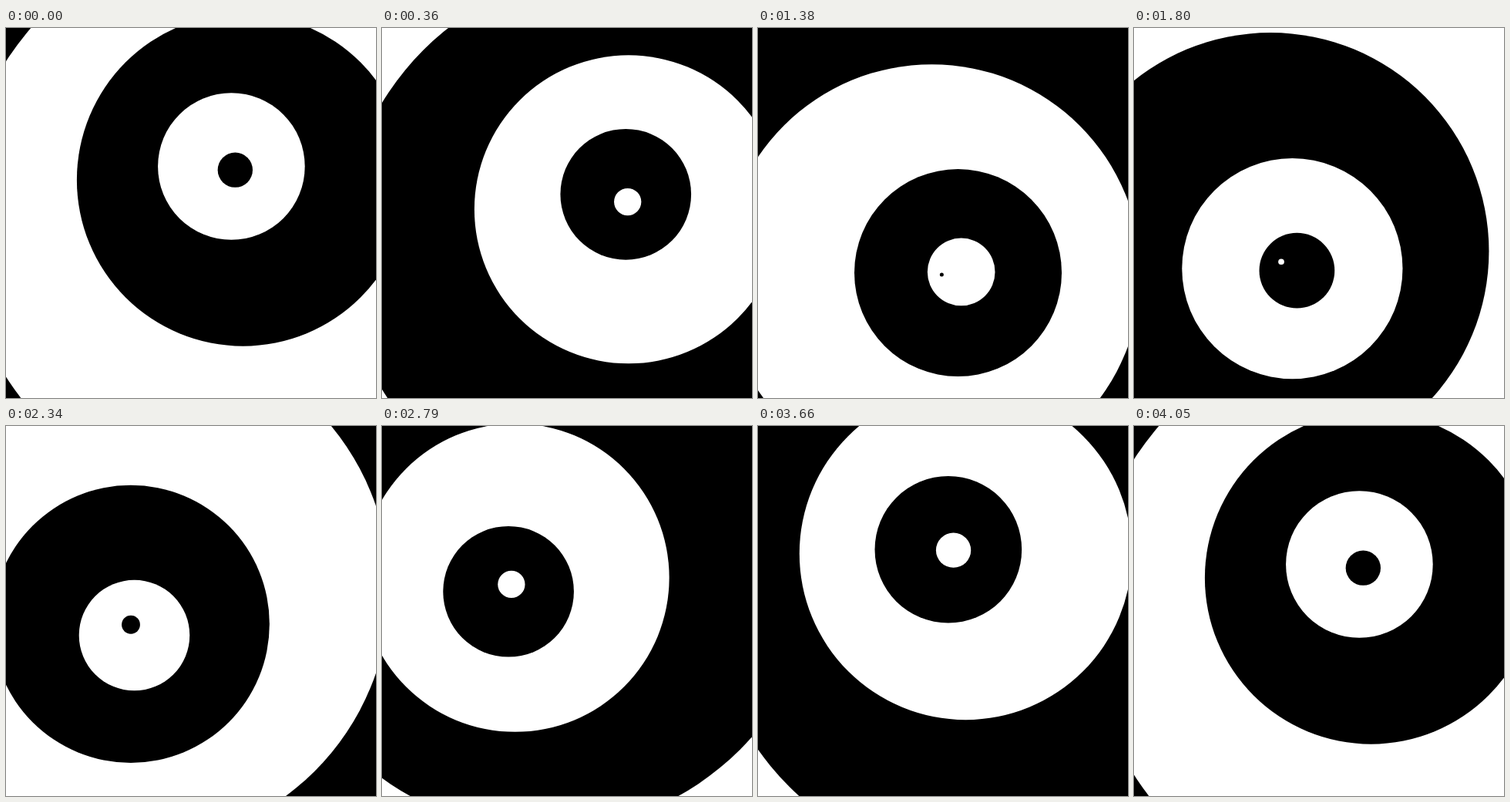
Write an HTML page that moves like this. It is 480 by 480 pixels and loops after 4080 ms.

```html
<!DOCTYPE html>
<html lang="en">
<head>
<meta charset="utf-8">
<title>Swaying rings</title>
<style>
  html, body { margin: 0; width: 100%; height: 100%; overflow: hidden; background: #000; }
  svg { display: block; width: 100%; height: 100%; }
</style>
</head>
<body>
<svg id="stage" viewBox="0 0 480 480"></svg>
<script>
const STEP = 30;            // ms per pose
const STEPS = 135;          // poses in one turn; the first is held twice
const LOOP = 4080;
const RINGS_PER_TURN = 10;
const RING_COUNT = 6;
const PAIR = 27;            // poses per black and white pair
const ORBIT = 80;

const stage = document.getElementById('stage');
const rings = Array.from({ length: RING_COUNT }, () => {
  const ring = document.createElementNS('http://www.w3.org/2000/svg', 'circle');
  stage.prepend(ring);      // younger rings stay on top
  return ring;
});

// Both take the age of a ring, counted in ring intervals.
const radiusAt = age => 3025 * Math.sin(0.0918 * age) ** 2;
const swayAt = age => -49.9 + 10.75 * (age - 1.67) ** 2;

function draw(ms) {
  const pose = Math.floor((ms % LOOP) / STEP) % STEPS;
  // The second half of each pair runs half a pose late.
  const late = pose % PAIR > PAIR / 2 ? 0.5 : 0;
  const turn = (pose - late) / STEPS;
  const phase = 0.944 + turn * RINGS_PER_TURN;
  const newest = Math.floor(phase);

  rings.forEach((ring, i) => {
    const id = newest - i;
    const age = phase - id;
    const angle = (turn * 360 + swayAt(age)) * Math.PI / 180;
    ring.setAttribute('cx', 240 + ORBIT * Math.cos(angle));
    ring.setAttribute('cy', 240 + ORBIT * Math.sin(angle));
    ring.setAttribute('r', radiusAt(age));
    ring.setAttribute('fill', id % 2 === 0 ? '#000' : '#fff');
  });
}

const start = performance.now();
function tick() {
  draw(performance.now() - start);
  requestAnimationFrame(tick);
}
tick();
</script>
</body>
</html>
```
